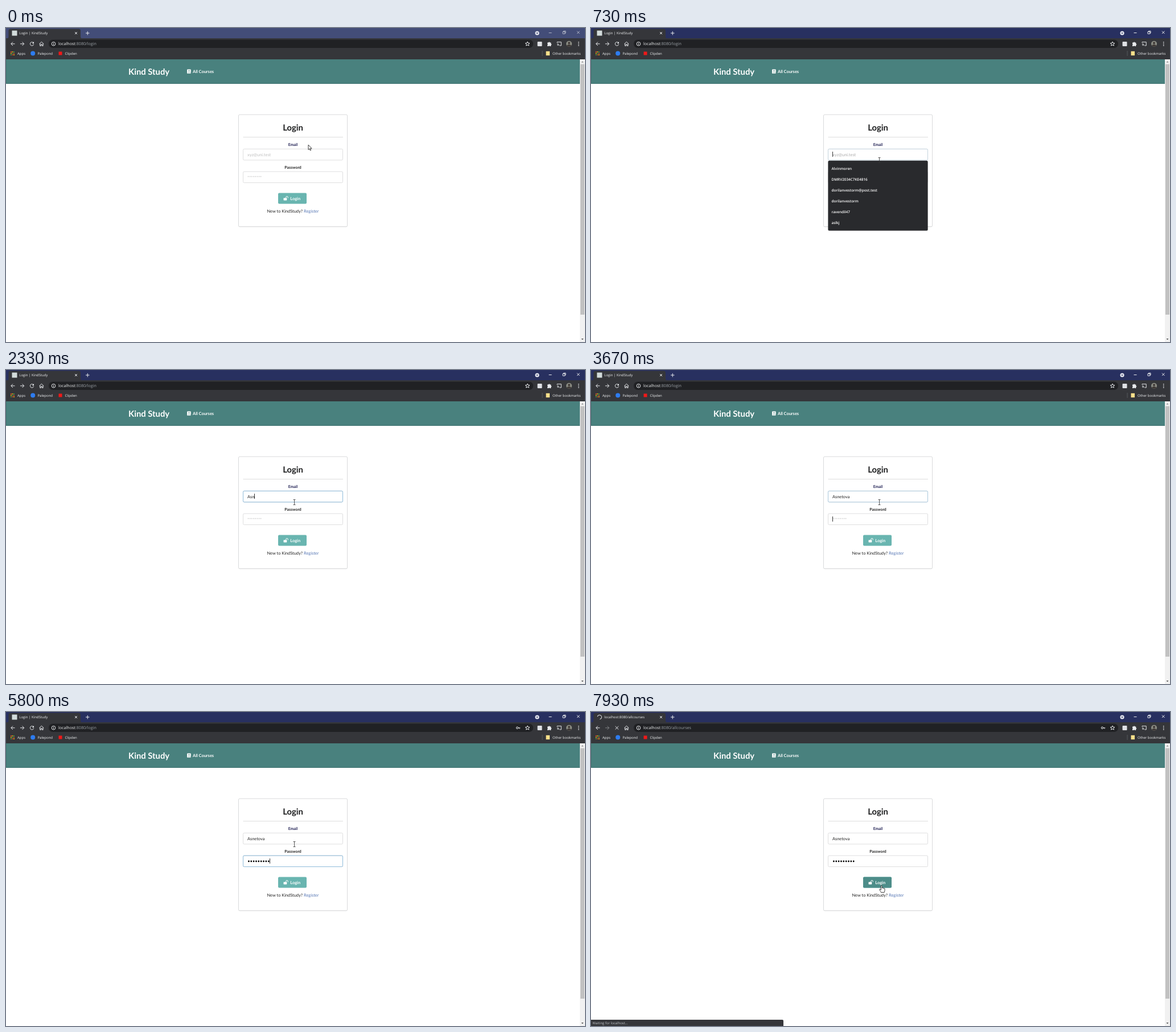
These frames come from a looping animation (1017 by 551 pixels, 8000 ms). An HTML page:

```html
<!DOCTYPE html>
<html lang="en">
<head>
<meta charset="utf-8">
<title>Login</title>
<style>
html, body { margin: 0; width: 100%; height: 100%; overflow: hidden; background: #fff; }
svg { display: block; width: 100vw; height: 100vh; text-rendering: geometricPrecision; }
.ui { font: 6px "Open Sans", sans-serif; fill: #f1f3f4; }
.url { font-size: 7.14px; }
.page { font: 7.42px Lato, sans-serif; fill: #222; }
.bold { font-weight: 700; }
.mid { text-anchor: middle; }
.icon { fill: none; stroke: #e8eaed; stroke-width: 1; }
.field { fill: #fff; stroke: #dededf; }
.focus { fill: none; stroke: #8fbcdb; }
.item { font: 600 6.4px "Open Sans", sans-serif; fill: #fff; }
</style>
</head>
<body>
<svg viewBox="0 0 1017 551" preserveAspectRatio="none">
  <!-- browser window -->
  <rect id="bar" width="1017" height="19"/>
  <path d="M1 18.5Q4.500 18.500 4.500 15V5Q4.500 1.500 8 1.500H127.500Q131 1.500 131 5V15Q131 18.500 134.500 18.500Z" fill="#35363a"/>
  <rect y="18" width="1017" height="37" fill="#35363a"/>
  <rect id="favicon" x="10.500" y="4.500" width="9" height="9" fill="#d3dcdc"/>
  <circle id="spinner" r="3.700" class="icon" stroke-dasharray="15.500 30"/>
  <text id="tab" class="ui" x="23.300" y="11.300"></text>
  <path class="icon" d="M121 7l4 4m0-4l-4 4M140 9h6.500M143.250 5.800v6.500"/>
  <circle cx="933" cy="9" r="3.600" fill="#e4e6ee"/>
  <path d="M931.200 8.200h3.600l-1.800 2.400z" fill="#283060"/>
  <path id="controls" class="icon" stroke-width=".8" d="M953.500 8.500h5M978 6.500h3.700v3.700h-3.700zM979.300 6.300V5.300h3.700V9h-1.100M1003 5.500l4.500 4.500m0-4.500l-4.500 4.500"/>

  <path class="icon" stroke-width="1.100" d="M15.500 27.800H8.800m3.200-3.200l-3.200 3.200l3.200 3.200"/>
  <path id="forward" class="icon" stroke-width="1.100" d="M25 27.800h6.700m-3.200-3.200l3.200 3.200l-3.200 3.200"/>
  <g id="reload"><path class="icon" d="M48.100 25.900A3.200 3.200 0 1 0 48.700 28.500"/><path d="M49 24v3.200h-3.200z" fill="#e8eaed"/></g>
  <path id="stop" class="icon" stroke-width="1.200" d="M42.700 25l5.600 5.600m0-5.600l-5.600 5.600"/>
  <path class="icon" d="M58.500 28l3.900-3.700l3.900 3.700M59.700 27.200v4.100h1.700v-2.500h2v2.500h1.700v-4.100"/>
  <rect x="75" y="20.500" width="851" height="14.500" rx="7.250" fill="#202124"/>
  <circle cx="83.500" cy="27.800" r="3.300" class="icon" stroke-width=".8"/>
  <path class="icon" stroke-width=".9" d="M83.500 27.300v2.400M83.500 25.700v.9"/>
  <text class="ui url" x="92" y="30.300">localhost<tspan id="path" fill="#9aa0a6"></tspan></text>
  <g id="key"><circle cx="898" cy="27.800" r="1.700" class="icon" stroke-width="1.200"/><path class="icon" stroke-width="1.300" d="M899.700 27.800h3.500M902 28v1.500"/></g>
  <path class="icon" stroke-width=".8" d="M916 24l1.100 2.500l2.700.2l-2.100 1.800l.7 2.600l-2.400-1.400l-2.400 1.400l.7-2.600l-2.100-1.800l2.700-.2z"/>
  <rect x="933.500" y="24" width="8" height="8" rx="1" fill="#dfe1e5"/>
  <path d="M951 25.600h2a1.100 1.100 0 0 1 2.200 0h2v2.100a1.100 1.100 0 0 1 0 2.200v2h-2.100a1.100 1.100 0 0 0-2.100 0h-2v-2.200a1.100 1.100 0 0 0 0-2z" fill="#e8eaed"/>
  <path class="icon" stroke-width=".9" d="M968 26v-1.300h7.200v6.200h-2.700M968 27.600a3.300 3.300 0 0 1 3.300 3.300M968 29.400a1.500 1.500 0 0 1 1.500 1.500"/>
  <circle cx="989" cy="27.800" r="5" fill="#8d8f86"/>
  <path d="M985 30.800a4.200 3 0 0 1 8 0a5 5 0 0 1-8 0z" fill="#413b38"/><circle cx="989" cy="26.300" r="2.100" fill="#413b38"/>
  <path d="M1005.700 24.300v8" stroke="#e8eaed" stroke-width="1.500" stroke-dasharray="1.500 1.400"/>

  <g id="apps"></g>
  <text class="ui" x="20" y="46.700">Apps</text>
  <circle cx="47.200" cy="44.500" r="4" fill="#2d7cf0"/>
  <text class="ui" x="55.500" y="46.700">Palepond</text>
  <rect x="92.500" y="41.500" width="6" height="6" fill="#f01818"/>
  <text class="ui" x="103.500" y="46.700">Clipden</text>
  <path d="M942 40v9" stroke="#5f6368" stroke-width=".8"/>
  <path d="M948.500 40.800h6.500v7.400h-6.500z" fill="#fbe08a"/>
  <text class="ui" x="960" y="46.700">Other bookmarks</text>

  <!-- page -->
  <rect y="55" width="1008" height="43" fill="#49817e"/>
  <path d="M.5 55V97.500H1008" fill="none" stroke="#3d716e"/>
  <text class="page bold" x="215" y="82" style="font-size:14.800px;fill:#fff">Kind Study</text>
  <rect x="318" y="72.600" width="6.700" height="7.500" rx="1" fill="#fff"/>
  <path d="M319.800 74.600h3.400M319.800 76h3.400M319 78.700h5.500" stroke="#49817e" stroke-width=".6"/>
  <text class="page bold" x="328" y="79" style="fill:#fff">All Courses</text>
  <rect x="1008" y="55" width="9" height="496" fill="#f1f1f1"/>
  <rect x="1009" y="63.500" width="7" height="439.500" fill="#c1c1c1"/>
  <path d="M1010.500 60.500h4l-2-2.300z" fill="#8a8a8a"/><path d="M1010.500 545h4l-2 2.300z" fill="#505050"/>

  <rect x="408.500" y="152.300" width="191" height="197" rx="2" fill="#d9dadb"/>
  <rect x="408.500" y="152" width="191" height="196.500" rx="2" fill="#fff" stroke="#d9dadb"/>
  <text class="page bold mid" x="504" y="180" style="font-size:14.800px;fill:#1b1c1d">Login</text>
  <path d="M416.500 191.500H592" stroke="#dedede"/>
  <text class="page bold mid" x="504" y="207" style="font-size:6.900px;fill:#1c1c50">Email</text>
  <rect class="field" x="416.500" y="212.300" width="175" height="19.500" rx="2"/>
  <rect class="focus" id="focus1" x="416.500" y="212.300" width="175" height="19.500" rx="2"/>
  <text class="page" id="hint1" x="424" y="224.800" style="fill:#000">xyz@uni.test</text>
  <text class="page" id="name" x="424" y="224.800"></text>
  <text class="page bold mid" x="504" y="246.700" style="font-size:6.900px">Password</text>
  <rect class="field" x="416.500" y="252" width="175" height="19.500" rx="2"/>
  <rect class="focus" id="focus2" x="416.500" y="252" width="175" height="19.500" rx="2"/>
  <text class="page" id="hint2" x="424" y="264.500" style="fill:#000">********</text>
  <g id="dots"></g>
  <rect id="caret" width="1" height="9" fill="#333"/>
  <rect x="478" y="289.500" width="50" height="19" rx="2" fill="#69b5b0"/>
  <rect id="hover" x="478" y="289.500" width="50" height="19" rx="2" fill="#4d8d89"/>
  <rect x="487.500" y="298.300" width="5.800" height="4.200" rx=".7" fill="#fff"/>
  <path d="M491.800 298.500v-1.400a1.700 1.700 0 0 1 3.400 0v1.300" fill="none" stroke="#fff"/>
  <text class="page bold" x="499.300" y="301.600" style="fill:#fff">Login</text>
  <text class="page mid" x="504" y="323.600">New to KindStudy? <tspan fill="#5576b4">Register</tspan></text>

  <g id="list">
    <rect id="panelShade" x="416" y="233.500" width="176" rx="2" fill="#0003"/>
    <rect id="panel" x="416.500" y="232.800" width="175" rx="2" fill="#292a2d"/>
    <g id="items"></g>
  </g>
  <g id="status">
    <path d="M0 540H336Q338 540 338 542V551H0Z" fill="#35363a"/>
    <text class="ui" x="2.500" y="548" style="fill:#c4c7cb">Waiting for localhost...</text>
  </g>
  <path id="cursor" stroke-width=".8" stroke-linejoin="round"/>
</svg>
<script>
const $ = id => document.getElementById(id);
const set = (id, attrs) => { for (const k in attrs) $(id).setAttribute(k, attrs[k]); };
const show = (id, on) => set(id, { opacity: +on });
const ramp = (f, a, b) => Math.min(1, Math.max(0, (f - a) / (b - a)));

// All times are in ticks of 1/15 s
const LOOP = 8000, USER = 'Asnetova';
const nameKeys = [26, 31, 35, 38, 45, 48, 49, 52];
const passKeys = [66, 69, 71, 74, 77, 79, 82, 85, 87];
const focusAt = 11, tabAt = 55, clickAt = 107, loadAt = 109;
const blinkStarts = [focusAt, ...nameKeys, tabAt, ...passKeys];
const saved = ['Alvinmoren', 'DMRV2034C7KE4816', 'dorilanvestorm@post.test', 'dorilanvestorm', 'ravendil47', 'aslkj'];
const matches = ['Alvinmoren', 'aslkj', 'aslkjl@kjhkjh'];
const route = [
  [0, 531, 205], [1, 528, 210], [3, 528, 210], [6, 516, 222], [10, 506.5, 232],
  [95, 506.5, 232], [96, 508, 226], [97, 515, 224], [98, 522, 240], [99, 525, 258],
  [100, 524, 275], [101, 517, 292], [102, 512, 301], [103, 510.3, 302],
  [107, 510.3, 302], [112, 510.3, 304.5], [120, 510.3, 304.5]
];
const shapes = {
  arrow: 'M0 0V8.6L2 6.8L3.300 9.900L4.700 9.300L3.400 6.300H6Z',
  beam: 'M-2-4.500H2M0-4.500V4.500M-2 4.500H2',
  hand: 'M-1 1a1 1 0 0 1 2 0V4.600a.9.9 0 0 1 1.700.3a.9.9 0 0 1 1.600.4a.8.8 0 0 1 1.400.6V9c0 1-.8 1.800-.8 3H-1c-.2-1.300-1.600-2.700-2.500-4.600c-.5-1 .6-1.600 1.300-.8L-1 7.800Z'
};

const appColors = ['#ea4335', '#fbbc04', '#34a853'];
$('apps').innerHTML = Array.from({ length: 9 }, (_, i) =>
  `<rect x="${8 + i % 3 * 2.6}" y="${41 + (i / 3 | 0) * 2.6}" width="1.7" height="1.7" fill="${appColors[(i + (i / 3 | 0)) % 3]}"/>`).join('');
$('dots').innerHTML = passKeys.map((_, i) => `<circle cx="${426.4 + i * 4.35}" cy="262" r="1.4"/>`).join('');

function pointer(f) {
  const i = Math.max(1, route.findIndex(p => p[0] >= f));
  const [t0, x0, y0] = route[i - 1], [t1, x1, y1] = route[i];
  const k = ramp(f, t0, t1), x = x0 + (x1 - x0) * k, y = y0 + (y1 - y0) * k;
  const inField = (y >= 212 && y < 232.5) || (y >= 252 && y < 272);
  const overList = f >= nameKeys[0] && f < nameKeys[2];
  const kind = y > 289 ? 'hand' : inField && !overList ? 'beam' : 'arrow';
  set('cursor', {
    d: shapes[kind], transform: `translate(${x} ${y})`,
    fill: kind === 'beam' ? 'none' : '#fff', stroke: kind === 'beam' ? '#333' : '#111'
  });
}

function suggestions(f) {
  const names = f < focusAt || f >= nameKeys[2] ? [] :
    f < nameKeys[0] ? saved : f < nameKeys[1] ? matches : matches.slice(1);
  const height = 8 + 19.1 * names.length;
  show('list', names.length > 0);
  set('panel', { height });
  set('panelShade', { height });
  $('items').innerHTML = names.map((s, i) => `<text class="item" x="422.5" y="${248.8 + i * 19.1}">${s}</text>`).join('');
}

function form(f) {
  const typed = nameKeys.filter(k => k <= f).length, dots = passKeys.filter(k => k <= f).length;
  const mail = ramp(f, 10, 13) - ramp(f, 54, 57), pass = ramp(f, 55, 57) - ramp(f, 106, 109);
  show('focus1', 0); show('focus2', 0);
  set('focus1', { opacity: mail });
  set('focus2', { opacity: pass });
  set('hint1', { opacity: typed ? 0 : .25 + .25 * mail });
  set('hint2', { opacity: dots ? 0 : .25 + .25 * pass });
  set('hover', { opacity: ramp(f, 100, 103) });
  $('name').textContent = USER.slice(0, typed);
  [...$('dots').children].forEach((dot, i) => dot.setAttribute('opacity', +(i < dots)));
  show('key', dots > 0);

  const inMail = f < tabAt, last = blinkStarts.filter(k => k <= f).pop();
  const x = inMail ? 424 + (typed ? $('name').getComputedTextLength() : 0) : 424.2 + 4.33 * dots;
  show('caret', f >= focusAt && f < clickAt && (f - last) % 16 < 8);
  set('caret', { x: Math.floor(x), y: inMail ? 217 : 257 });
}

function browser(f) {
  const loading = f >= loadAt, active = f >= 10;
  set('bar', { fill: active ? '#283060' : '#434d78' });
  set('controls', { opacity: active ? 1 : .65 });
  $('tab').textContent = loading ? 'localhost:8080/allcourses' : 'Login | KindStudy';
  $('path').textContent = loading ? ':8080/allcourses' : ':8080/login';
  show('favicon', !loading);
  show('spinner', loading);
  set('spinner', { transform: `translate(15 9) rotate(${195 - (f - 119) * 18})` });
  show('reload', !loading);
  show('stop', loading);
  set('forward', { opacity: loading ? .4 : 1 });
  set('status', { opacity: ramp(f, 110, 113) });
}

function draw(now) {
  const f = Math.floor(now % LOOP * .015 + .06);
  browser(f);
  form(f);
  suggestions(f);
  pointer(f);
}

const start = performance.now();
function loop() {
  draw(performance.now() - start);
  requestAnimationFrame(loop);
}
loop();
</script>
</body>
</html>
```
